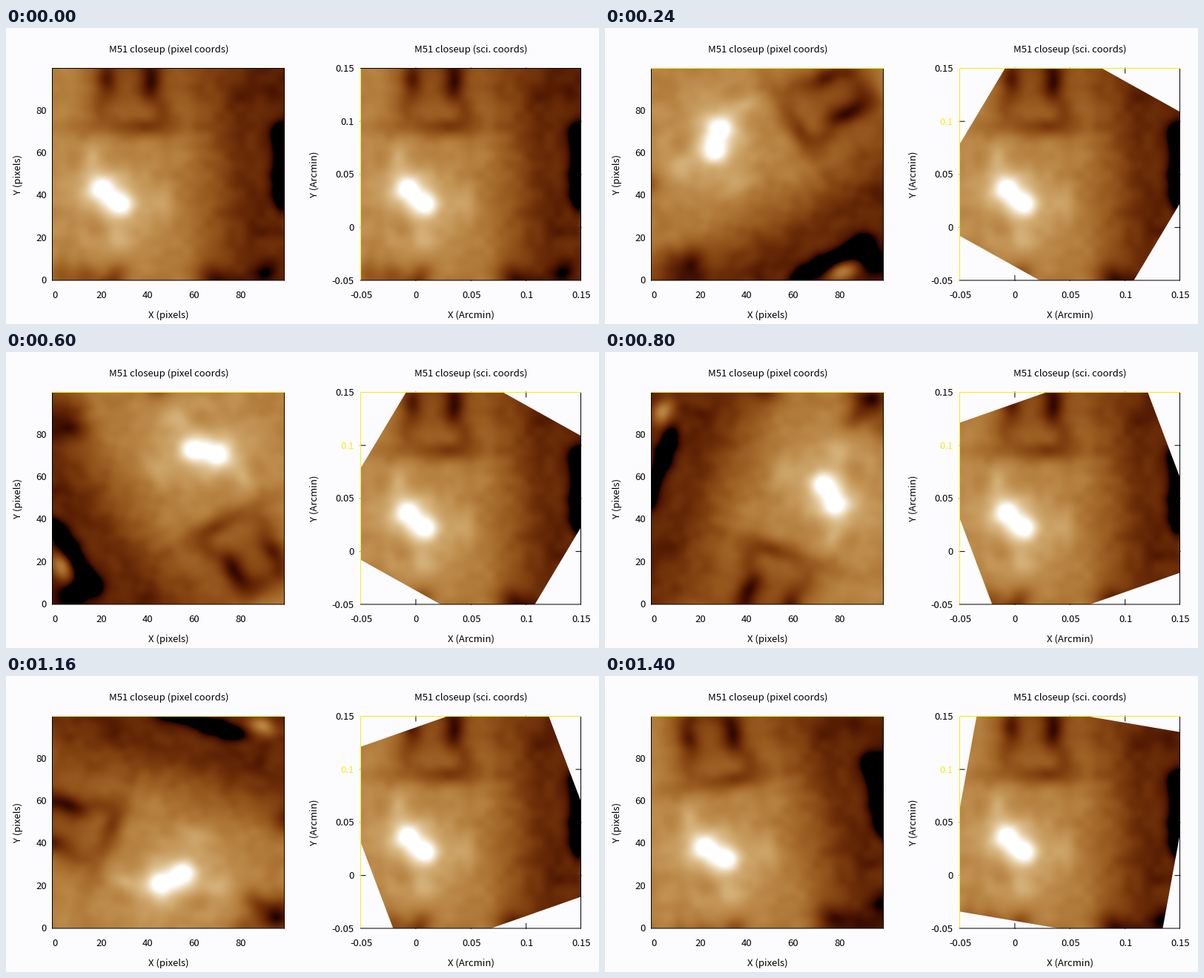
These frames come from a looping animation (800 by 400 pixels, 1440 ms). A matplotlib script:

```python
import numpy as np
import matplotlib.pyplot as plt
from matplotlib.animation import FuncAnimation
from matplotlib.transforms import Affine2D

W, H, DPI = 800, 400, 100
FRAMES, STEP = 36, 10
LEFT, RIGHT = (62, 376), (478, 776)      # panel spans in x
TOP, BOTTOM = 54, 341.5
PAPER, YELLOW = "#fcfcfe", "#f6ea1c"
FONT = 13.1 * 72 / DPI

plt.rcParams["font.family"] = "Noto Sans CJK JP"
NOISE = np.random.default_rng(51).uniform(-1, 1, (48, 48))


# Sky brightness, 0 to 1, in panel coordinates 0 to 100

def sigmoid(t):
    return 1 / (1 + np.exp(-t))


def blob(x, y, cx, cy, sx, sy=None):
    return np.exp(-((x - cx) / sx) ** 2 / 2 - ((y - cy) / (sy or sx)) ** 2 / 2)


def mottle(x, y, pitch):
    """Smooth value noise on a square lattice."""
    u, v = x / pitch + 8, y / pitch + 8
    i, j = u.astype(int), v.astype(int)
    s, t = u - i, v - j
    s, t = s * s * (3 - 2 * s), t * t * (3 - 2 * t)
    low = NOISE[j, i] * (1 - s) + NOISE[j, i + 1] * s
    high = NOISE[j + 1, i] * (1 - s) + NOISE[j + 1, i + 1] * s
    return low * (1 - t) + high * t


def disc(x, y):
    """Tan on the left, dark brown on the right, dimmer at the top."""
    return (0.13 + 0.37 * sigmoid((70 - x) / 7)
            - 0.11 * blob(x, y, 55, 95, 20, 14))


def core(x, y):
    """White nucleus of two knots in a halo, with a spur upwards."""
    halo = 0.2 * blob(x, y, 24, 37, 13, 14) + 0.14 * blob(x, y, 17, 57, 3, 6)
    patches = (0.1 * blob(x, y, 45, 37, 6) + 0.1 * blob(x, y, 29, 20, 5)
               - 0.13 * blob(x, y, 18, 26, 3.5, 4))
    knots = blob(x, y, 21.5, 43.5, 4.6) + blob(x, y, 29.5, 36, 4)
    return halo + patches + 0.42 * knots


def chevron(x, y):
    """Two dark slits about a paler wedge, above a dark bar."""
    slits = sum(blob(x, y, 33 + side * 9.5, 94, 3.5, 7) for side in (-1, 1))
    ends = sum(blob(x, y, 34 + side * 14, 80, 3, 4) for side in (-1, 1))
    return -(0.3 * slits + 0.1 * ends
             + 0.12 * blob(x, y, 33, 87, 13, 8)
             + 0.24 * blob(x, y, 33, 105, 10, 5)
             + 0.2 * blob(x, y, 36, 72, 15, 3.5))


def lane(x, y):
    """Black dust lane at the right, with two bright knots beyond it."""
    window = sigmoid((y - 33) / 2) * sigmoid((72 - y) / 2)
    knots = sum(blob(x, y, 106, cy, 3, 4.5) for cy in (28, 55))
    return (0.38 * knots - 0.3 * window * blob(x, y, 99, 53, 3, 40)
            - 0.3 * blob(x, y, 106, 69, 7, 4))


def clumps(x, y):
    """Dark clumps along the lower edge."""
    row = sum(blob(x, y, cx, 3, 4, 4.5) for cx in (3, 14, 28, 68, 92))
    return -(0.16 * row + 0.5 * blob(x, y, 24, -9, 6)
             + 0.2 * blob(x, y, 72, -6, 10, 7))


def galaxy(x, y):
    parts = sum(part(x, y) for part in (disc, core, chevron, lane, clumps))
    grain = 0.035 * mottle(x, y, 8) + 0.025 * mottle(x, y, 4.5)
    return np.clip(parts + grain, 0, 1)


def sepia(v):
    return np.dstack([np.sqrt(v), v, v * v])


def centres(n, lo=0, hi=100):
    return lo + (np.arange(n) + 0.5) * (hi - lo) / n


# Page furniture

fig = plt.figure(figsize=(W / DPI, H / DPI), dpi=DPI, facecolor=PAPER)


def stage(zorder):
    """Transparent axes measured in pixels, y downwards."""
    ax = fig.add_axes([0, 0, 1, 1], zorder=zorder)
    ax.set(xlim=(0, W), ylim=(H, 0))
    ax.axis("off")
    return ax


def panel(span, rgb, lo, hi, smoothing):
    x0, x1 = span
    ax = fig.add_axes([x0 / W, 1 - BOTTOM / H, (x1 - x0) / W,
                       (BOTTOM - TOP) / H], zorder=1)
    image = ax.imshow(rgb, origin="lower", extent=(lo, hi, lo, hi),
                      aspect="auto", interpolation=smoothing)
    ax.set(xlim=(0, 100), ylim=(0, 100))
    ax.axis("off")
    return ax, image


def line(ax, xs, ys, color="black"):
    return ax.plot(xs, ys, color=color, lw=72 / DPI, snap=False,
                   solid_capstyle="projecting")[0]


def label(x, y, text, ha="center"):
    return over.text(x, y, text, ha=ha, va="baseline", fontsize=FONT)


def side_label(x, text):
    over.text(x, 198, text, rotation=90, ha="center", va="center",
              fontsize=FONT)


def frame(span, side="black"):
    """Draw a border and return its top edge."""
    x0, x1, y0, y1 = span[0] + 0.5, span[1] - 0.5, TOP + 0.5, BOTTOM - 0.5
    line(over, [x0, x0], [y0, y1], side)
    line(over, [x1, x1], [y0, y1])
    line(over, [x0, x1], [y1, y1])
    return line(over, [x0, x1], [y0, y0])


under, over = stage(0), stage(2)

# Left: the sky turns inside a fixed pixel window
g = centres(400, -24, 124)
left, sky = panel(LEFT, sepia(galaxy(*np.meshgrid(g, g))), -24, 124,
                  "bilinear")

# Right: the sky stays and the window turns
gx, gy = np.meshgrid(centres(RIGHT[1] - RIGHT[0]), centres(288))
still = np.dstack([sepia(galaxy(gx, gy)), np.ones_like(gx)])
right, view = panel(RIGHT, still, 0, 100, "nearest")

for n in (1, 2, 3):
    x, y = 478.5 + 74.4 * n, 54.5 + 71.7 * n
    for y0 in (TOP, BOTTOM - 7):
        line(under, [x, x], [y0, y0 + 7])
    for x0 in (RIGHT[0], RIGHT[1] - 7):
        line(under, [x0, x0 + 7], [y, y])

tinted = [frame(LEFT), frame(RIGHT, YELLOW)]

for n in range(0, 100, 20):
    label(66 + 3.13 * n, 365, str(n))
    label(55, 345 - 2.865 * n, str(n), "right")
for n in range(5):
    text = f"{(n - 1) / 20:g}"
    label(479 + 74.4 * n, 365, text)
    tick = label(469.5, 345.5 - 71.6 * n, text, "right")
    if text == "0.1":
        tinted.append(tick)

for x, title, unit, name in ((219.5, "pixel", "pixels", 16),
                             (627, "sci.", "Arcmin", 416)):
    label(x, 33, f"M51 closeup ({title} coords)")
    label(x, 392, f"X ({unit})")
    side_label(name, f"Y ({unit})")


def draw(i):
    turn = STEP * i
    sky.set_transform(Affine2D().rotate_deg_around(50, 50, -turn)
                      + left.transData)
    c, s = np.cos(np.radians(turn)), np.sin(np.radians(turn))
    dx, dy = gx - 50, gy - 50
    reach = np.maximum(abs(dx * c + dy * s), abs(dy * c - dx * s))
    still[..., 3] = np.clip((50 - reach) * 3 + 0.9, 0, 1)
    view.set_data(still)
    for item in tinted:
        item.set_color(YELLOW if i else "black")
    return [sky, view, *tinted]


anim = FuncAnimation(fig, draw, frames=FRAMES, interval=40, repeat=True,
                     repeat_delay=0, blit=False)
plt.show()
```
